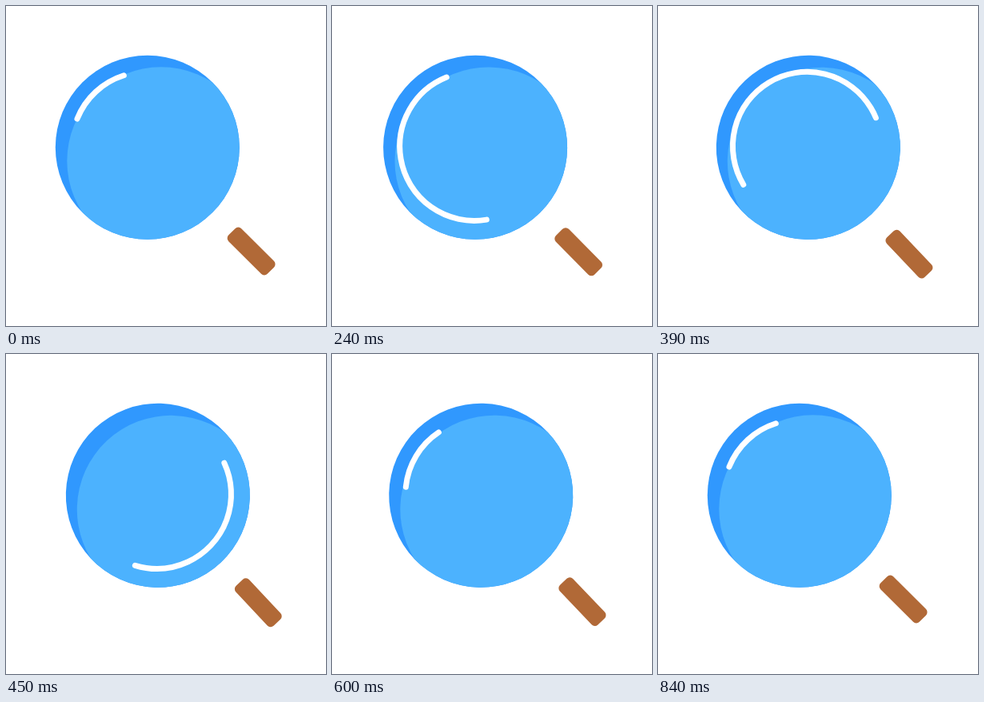
Recreate the animation shown at these times as an HTML page. Size 400 px wide and 400 px high, loop 2.87 s.

```html
<!DOCTYPE html>
<html lang="en">
<head>
<meta charset="utf-8">
<title>Magnifying glass</title>
<style>
  html, body { margin: 0; width: 100%; height: 100%; overflow: hidden; background: #fff; }
  svg { display: block; width: 100%; height: 100%; }
</style>
</head>
<body>
<svg viewBox="0 0 400 400">
  <clipPath id="lens"><circle cx="176.8" cy="176.8" r="115"/></clipPath>
  <g id="glass">
    <circle cx="176.8" cy="176.8" r="115" fill="#3098fe"/>
    <circle cx="193.8" cy="193.8" r="117.5" fill="#4cb2fe" clip-path="url(#lens)"/>
    <rect x="272.3" y="295.2" width="68.6" height="22.6" rx="5.5" fill="#b16937" transform="rotate(45 306.6 306.5)"/>
    <circle id="shine" cx="175.4" cy="175.4" r="93" pathLength="360" fill="none" stroke="#fff" stroke-width="7" stroke-linecap="round"/>
  </g>
</svg>
<script>
const LOOP = 2870, STEP = 30, END = 840;
const glass = document.getElementById('glass');
const shine = document.getElementById('shine');

// Sine ease, held at 0 before and at 1 after.
const ease = p => (1 - Math.cos(Math.PI * Math.min(Math.max(p, 0), 1))) / 2;

// Rises from 0 to 1 at the peak and falls back to 0.
const hump = (t, from, peak, to) =>
  ease((t - from) / (peak - from)) * ease((to - t) / (to - peak));

// Speeds up until the knee, then slows down to rest at 1.
function spin(t) {
  const knee = 390, reached = .744;
  return t < knee
    ? reached * (t / knee) ** 1.68
    : 1 - (1 - reached) * ((END - t) / (END - knee)) ** 4.4;
}

function draw(now) {
  const t = Math.min(Math.floor(now % LOOP / STEP) * STEP, END);
  const x = 13.3 * hump(t, 150, 480, 810);
  const head = 252.4 + 1080 * spin(t);
  const span = 50.7 + 151 * hump(t, 0, 350, 560);
  glass.setAttribute('transform', `translate(${x} 0) rotate(${x * .145} 176.8 176.8)`);
  shine.setAttribute('transform', `rotate(${head - span} 175.4 175.4)`);
  shine.setAttribute('stroke-dasharray', `${span} 360`);
}

let start;
function tick(now) {
  start ??= now;
  draw(now - start);
  requestAnimationFrame(tick);
}
draw(0);
requestAnimationFrame(tick);
</script>
</body>
</html>
```
